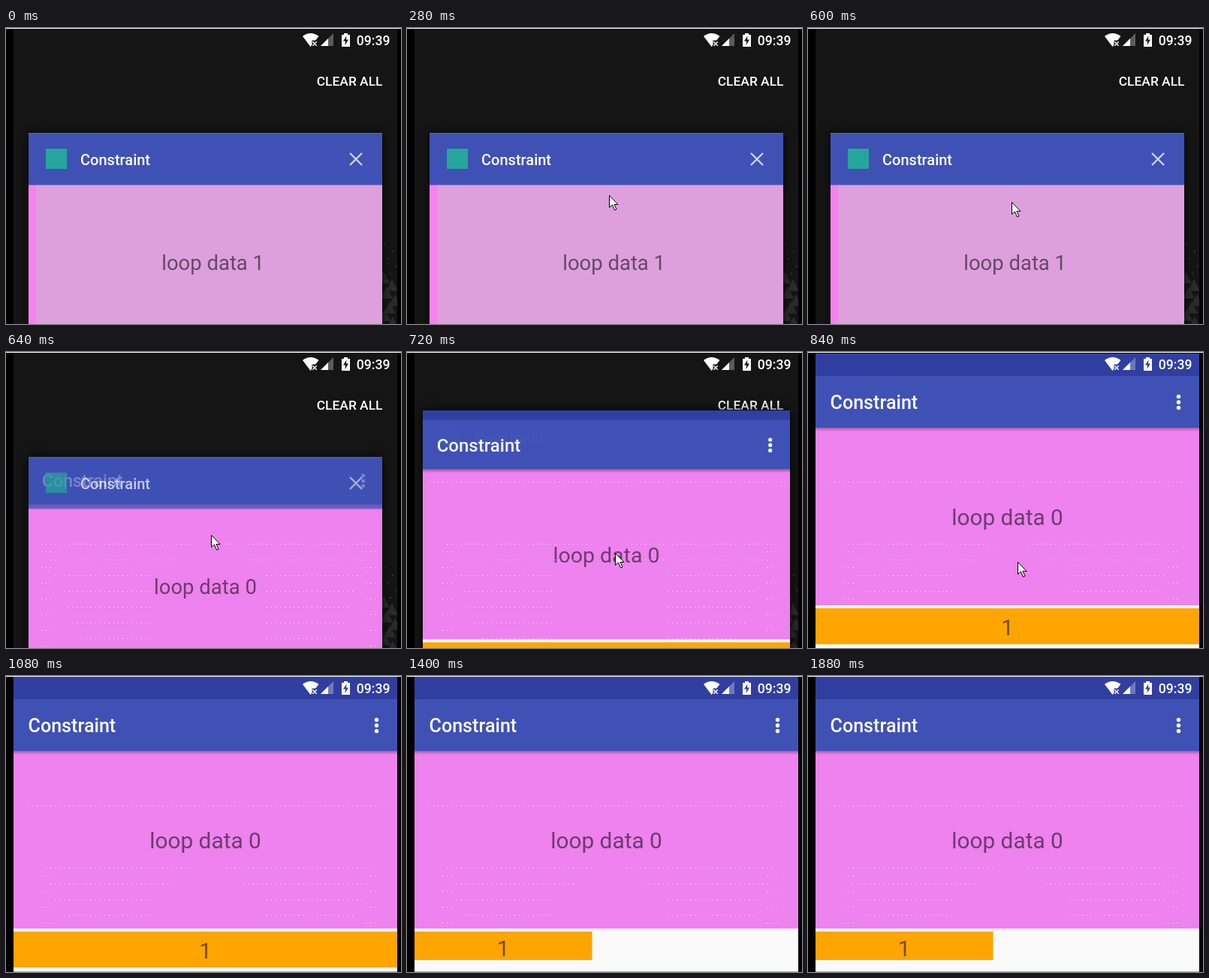
An HTML page with a canvas for the animation above (2440 ms loop, 526 by 395 pixels).

```html
<!DOCTYPE html>
<html lang="en">
<head>
<meta charset="utf-8">
<title>Opening an app from recents</title>
<style>
  html, body { margin: 0; width: 100%; height: 100%; overflow: hidden; background: #000; }
  canvas { display: block; }
</style>
</head>
<body>
<canvas id="stage" width="526" height="395"></canvas>
<script>
const ctx = document.getElementById('stage').getContext('2d');
const LOOP = 2440, STEP = 40;
const LEFT = 10, RIGHT = 521, WIDTH = RIGHT - LEFT, BOTTOM = 395;
const BLUE = '#3f51b5', DARK_BLUE = '#303f9f', VIOLET = '#ee82ee', PLUM = '#dda0dd';
const ORANGE = '#ffa500', PAPER = '#fafafa', INK = 'rgba(0,0,0,.54)', NIGHT = '#151515';

const WIFI = new Path2D('M395 11Q405.5 3 416.5 11L405.5 25Z');
const BOLT = new Path2D('M453.5 10.5l-4.5 7h3l-.5 5.5 4.5-7.5h-3z');
const ARROW = new Path2D('M0 0v16l4-3.5 3 7 2.5-1-3-6.5h5z');

const POINTER_MOVES = [
  { start: 80, end: 280, from: [513, 57], to: [269, 223] },
  { start: 540, end: 760, from: [269, 223], to: [278, 272] },
  { start: 800, end: 1060, from: [278, 272], to: [300, 396] },
  { start: 1760, end: 1880, from: [443, 376], to: [540, 180] }
];

const clamp = v => Math.max(0, Math.min(1, v));
const mix = (a, b, k) => a + (b - a) * k;
const smooth = u => u * u * (3 - 2 * u);

// cubic-bezier(.4, 0, .2, 1)
function fastOutSlowIn(x) {
  let lo = 0, hi = 1;
  for (let i = 0; i < 24; i++) {
    const u = (lo + hi) / 2, v = 1 - u;
    if (1.2 * v * v * u + 0.6 * v * u * u + u ** 3 < x) lo = u; else hi = u;
  }
  return smooth(lo);
}

function rect(color, x, y, w, h) {
  ctx.fillStyle = color;
  ctx.fillRect(x, y, w, h);
}

function triangle(color, ax, ay, bx, by, cx, cy) {
  ctx.fillStyle = color;
  ctx.beginPath();
  ctx.moveTo(ax, ay);
  ctx.lineTo(bx, by);
  ctx.lineTo(cx, cy);
  ctx.fill();
}

function cross(color, x, y, r, lineWidth) {
  ctx.strokeStyle = color;
  ctx.lineWidth = lineWidth;
  ctx.beginPath();
  for (const dy of [-r, r]) {
    ctx.moveTo(x - r, y + dy);
    ctx.lineTo(x + r, y - dy);
  }
  ctx.stroke();
}

function label(text, x, baseline, size, { color = '#fff', align = 'left', weight = 500 } = {}) {
  ctx.font = `${weight} ${size}px Roboto, sans-serif`;
  ctx.textAlign = align;
  ctx.fillStyle = color;
  ctx.fillText(text, x, baseline);
}

const bodyText = (text, x, baseline) =>
  label(text, x, baseline, 29.8, { color: INK, align: 'center', weight: 400 });

function drawRecents() {
  rect(NIGHT, LEFT, 1, WIDTH, BOTTOM);
  // wooded wallpaper showing beside the card
  for (let i = 0; i < 7; i++) {
    const x = 503 + i * 11 % 18, y = 325 + i * 10;
    triangle('#2b2b2b', x, y, x + 8, y + 16, x - 8, y + 16);
    rect('#333', x, y - 38, 2, 2);
  }
  label('CLEAR ALL', 501.5, 77, 17.4, { align: 'right' });
}

function drawStatusIcons(background) {
  ctx.fillStyle = '#fff';
  ctx.fill(WIFI);
  rect(background, 407.5, 16.5, 9, 9);
  cross('#fff', 411, 21, 2.7, 1.4);

  triangle('rgba(255,255,255,.3)', 419, 24, 436, 24, 436, 7);
  triangle('#fff', 419, 24, 429, 24, 429, 14);

  rect('#fff', 450, 7, 5, 2);
  rect('#fff', 447, 9, 11, 16);
  ctx.fillStyle = background;
  ctx.fill(BOLT);
  label('09:39', 511.5, 23, 17.6, { align: 'right' });
}

function drawApp(t) {
  const snapshot = t < 640, shrunk = t >= 1400;
  rect(PAPER, LEFT, 1, WIDTH, 430);
  rect(VIOLET, LEFT, 100, WIDTH, 237);
  if (snapshot) {
    rect('#f582ee', LEFT, 100, 11, 237);
    rect(PLUM, LEFT + 11, 100, WIDTH - 11, 237);
    bodyText('loop data 1', 276.5, 230);
  } else {
    bodyText('loop data 0', 265.5, 230);
  }
  rect(ORANGE, LEFT, 341, shrunk ? 236.5 : WIDTH, shrunk ? 38 : 48);
  bodyText('1', shrunk ? 128 : 265.5, shrunk ? 374 : 377);
  rect(ORANGE, LEFT, 394, WIDTH, 48);

  rect(BLUE, LEFT, 1, WIDTH, 99);
  rect(DARK_BLUE, LEFT, 1, WIDTH, 30);
  const shadow = ctx.createLinearGradient(0, 100, 0, 105);
  shadow.addColorStop(0, 'rgba(0,0,0,.3)');
  shadow.addColorStop(1, 'rgba(0,0,0,0)');
  rect(shadow, LEFT, 100, WIDTH, 5);
  label('Constraint', 29.5, 75, 25.1);
  ctx.fillStyle = '#fff';
  for (let i = -1; i <= 1; i++) {
    ctx.beginPath();
    ctx.arc(493.5, 66 + i * 7.5, 2.7, 0, 7);
    ctx.fill();
  }
}

// Task header, placed relative to the top left corner of its card.
function drawTaskHeader(x, y, width, alpha) {
  ctx.save();
  ctx.globalAlpha = alpha;
  ctx.translate(x, y);
  rect(BLUE, 0, 0, width, 69.5);
  rect('#5a69bf', 0, 0, width, 1);
  rect('#26a69a', 23, 21, 28, 27);
  label('Constraint', 69, 42.5, 20);
  cross('#d0d5ee', width - 35, 35, 8, 2.3);
  ctx.restore();
}

// Rows of fine dots, symmetric about the middle and narrowing downwards.
function drawDots(t, bottom) {
  const row = (y, inner, outer) => {
    for (let x = 29; x <= 505; x += 6) {
      const distance = Math.abs(x - 269);
      if (y < bottom && distance >= inner && distance <= outer) rect('rgba(255,255,255,.8)', x, y, 1, 1);
    }
  };
  if (t >= 720) row(173, 0, 240);
  for (let i = 0; i < 7; i++) {
    const y = 256 + i * 21;
    row(y, 20 + 27 * Math.min(i, 2), 220 - i * 8);
    row(y + 10, 210, 222);
  }
}

function drawPointer(t) {
  const move = POINTER_MOVES.findLast(m => t >= m.start);
  if (!move) return;
  const k = smooth(clamp((t - move.start) / (move.end - move.start)));
  const [x, y] = move.from.map((v, axis) => Math.round(mix(v, move.to[axis], k)) + .5);
  ctx.save();
  ctx.translate(x, y);
  ctx.fillStyle = '#fff';
  ctx.fill(ARROW);
  ctx.strokeStyle = '#000';
  ctx.lineWidth = 1;
  ctx.stroke(ARROW);
  ctx.restore();
}

function draw(t) {
  const grow = fastOutSlowIn(clamp((t - 643) / 232));
  const left = Math.round(mix(30, LEFT, grow));
  const top = Math.round(mix(112.3, 1, grow));
  const width = LEFT + RIGHT - 2 * left, scale = width / WIDTH;
  const clipTop = Math.round(top + 30 * (1 - grow) * scale);

  rect('#000', 0, 0, 526, BOTTOM);
  drawRecents();

  ctx.save();
  ctx.shadowColor = 'rgba(0,0,0,.8)';
  ctx.shadowBlur = 12;
  rect(BLUE, left, clipTop, width, BOTTOM);
  ctx.restore();

  ctx.save();
  ctx.beginPath();
  ctx.rect(left, clipTop, width, BOTTOM);
  ctx.clip();
  ctx.save();
  ctx.translate(left, top);
  ctx.scale(scale, scale);
  ctx.translate(-LEFT, -1);
  drawApp(t);
  ctx.restore();
  const headerAlpha = t < 640 ? 1 : clamp(.7 - (t - 640) / 120);
  drawTaskHeader(left, clipTop, width, headerAlpha);
  if (t >= 640) drawDots(t, top + 336 * scale);
  ctx.restore();

  rect('#000', 0, 0, LEFT, BOTTOM);
  rect('#000', RIGHT, 0, 5, BOTTOM);
  drawStatusIcons(clipTop < 16 ? DARK_BLUE : NIGHT);
  drawPointer(t);
  rect('#fff', 0, 0, 526, 1);
}

const start = performance.now();
function tick() {
  const t = (performance.now() - start) % LOOP;
  draw(Math.floor(t / STEP) * STEP);
  requestAnimationFrame(tick);
}
tick();
</script>
</body>
</html>
```
